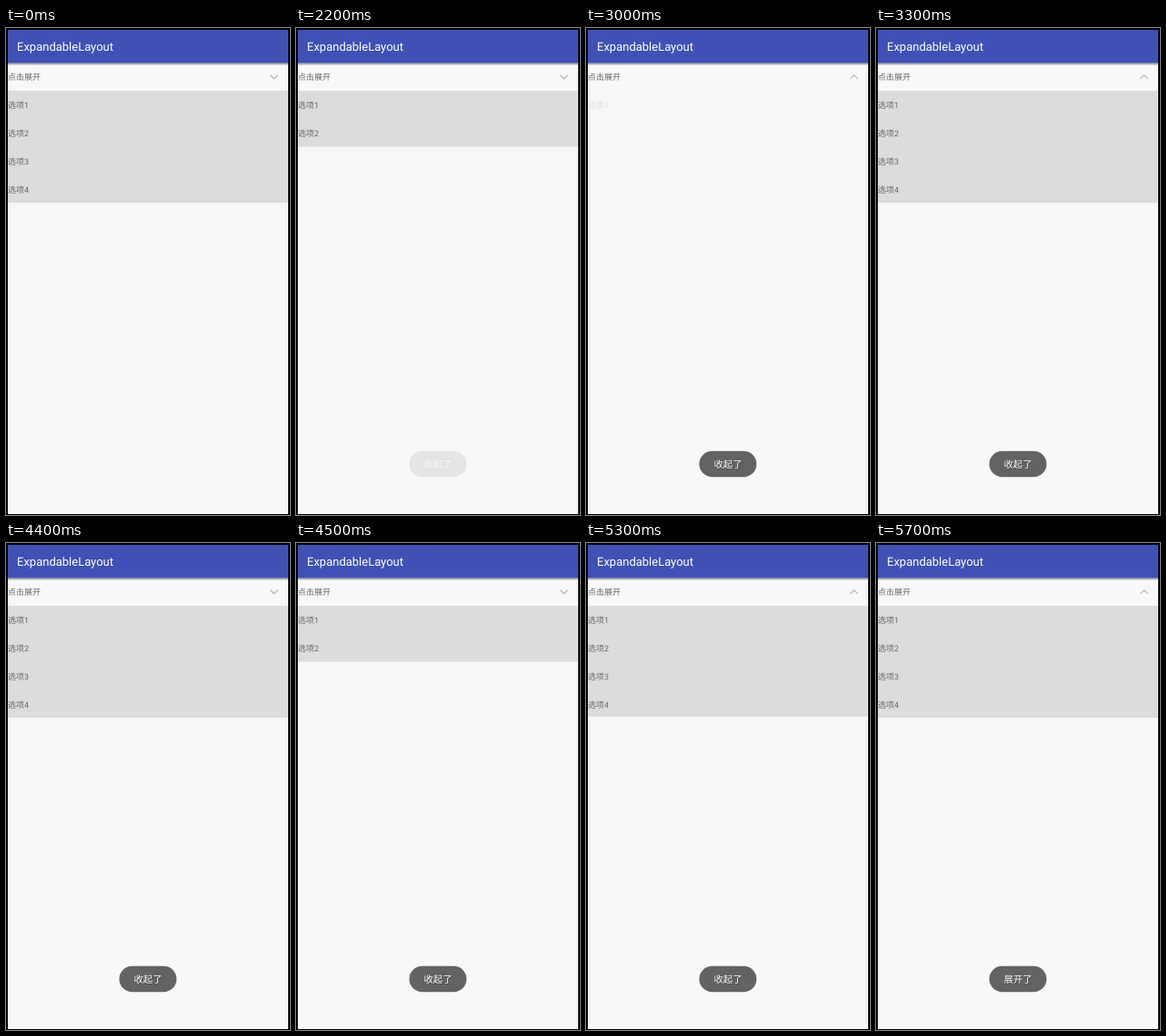
An HTML page for the animation above (7700 ms loop, 312 by 535 pixels).

```html
<!DOCTYPE html>
<html lang="zh-CN">
<head>
<meta charset="utf-8">
<title>ExpandableLayout</title>
<style>
  html, body { margin: 0; width: 100%; height: 100%; overflow: hidden; background: #000; }
  svg { display: block; width: 100%; height: 100%; }
  text {
    font-family: Roboto, "Noto Sans CJK SC", "Noto Sans CJK", sans-serif;
    font-size: 9px;
    fill: #696969;
    text-rendering: geometricPrecision;
  }
  .title { font-size: 13px; fill: #fff; }
  .msg { font-size: 10.3px; fill: #fff; text-anchor: middle; }
  .shade { fill: #333; opacity: .6; }
</style>
</head>
<body>
<svg viewBox="0 0 312 535">
  <defs>
    <linearGradient id="shadow" x2="0" y2="1">
      <stop stop-color="#555" stop-opacity=".75"/>
      <stop offset="1" stop-color="#888" stop-opacity="0"/>
    </linearGradient>
    <clipPath id="clip"><rect id="window" x="2" y="69" width="308"/></clipPath>
  </defs>
  <rect width="312" height="535" fill="#000"/>
  <rect x="2" y="2" width="308" height="532" fill="#f8f8f8"/>
  <rect x="2" y="2" width="308" height="36.5" fill="#3f51b5"/>
  <rect x="2" y="38.5" width="308" height="3" fill="url(#shadow)"/>
  <text class="title" x="12" y="25">ExpandableLayout</text>
  <text x="2" y="57.3">点击展开</text>
  <path id="chevron" fill="none" stroke="#c3c3c3" stroke-width="1.5"/>
  <rect id="blank" x="2" y="69" width="308" height="123" fill="#fbfbfb"/>
  <g clip-path="url(#clip)">
    <rect id="panel" x="2" y="69" width="308" height="123" fill="#dcdcdc"/>
    <g id="items"></g>
  </g>
  <g id="toast">
    <rect x="124.4" y="464.8" width="63" height="28.4" rx="14.2" fill="#636363"/>
    <text class="msg shade" x="156.5" y="483.6"></text>
    <text class="msg" x="156" y="483"></text>
  </g>
</svg>
<script>
const LOOP = 7700, STEP = 100, FULL = 123, ROW = 30.8;
const $ = id => document.getElementById(id);
const set = (id, name, value) => $(id).setAttribute(name, value);
const clamp = x => Math.min(1, Math.max(0, x));
const ease = (t, start, length) => (1 - Math.cos(Math.PI * clamp((t - start) / length))) / 2;
const labels = document.querySelectorAll(".msg");

for (let i = 0; i < 4; i++) {
  $("items").insertAdjacentHTML("beforeend",
    `<text x="2" y="${88.2 + i * ROW}">选项${i + 1}</text>`);
}

function draw(time) {
  const t = Math.floor((time % LOOP) / STEP) * STEP;
  const collapse = start => 1 - ease(t, start, 200);
  const expand = start => ease(t, start, 300);

  let open, fade = 1;
  if (t < 3000) open = collapse(2100);
  else if (t < 4400) open = fade = expand(2920);
  else if (t < 5100) open = collapse(4400);
  else open = fade = expand(5020);

  set("window", "height", FULL * open);
  set("panel", "opacity", fade * fade);
  set("items", "opacity", fade);
  set("blank", "opacity", t >= 4600 && t < 5100 ? 1 : 0);

  const up = (t >= 3000 && t < 4400) || t >= 5100;
  set("chevron", "d", up ? "M290.3 55.8l4.2-4 4.2 4" : "M290.3 51.6l4.2 4 4.2-4");

  set("toast", "opacity", ease(t, 2110, 400));
  const message = t < 5700 ? "收起了" : "展开了";
  labels.forEach(label => { label.textContent = message; });
}

const begin = performance.now();
function tick() {
  draw(performance.now() - begin);
  requestAnimationFrame(tick);
}
tick();
</script>
</body>
</html>
```
